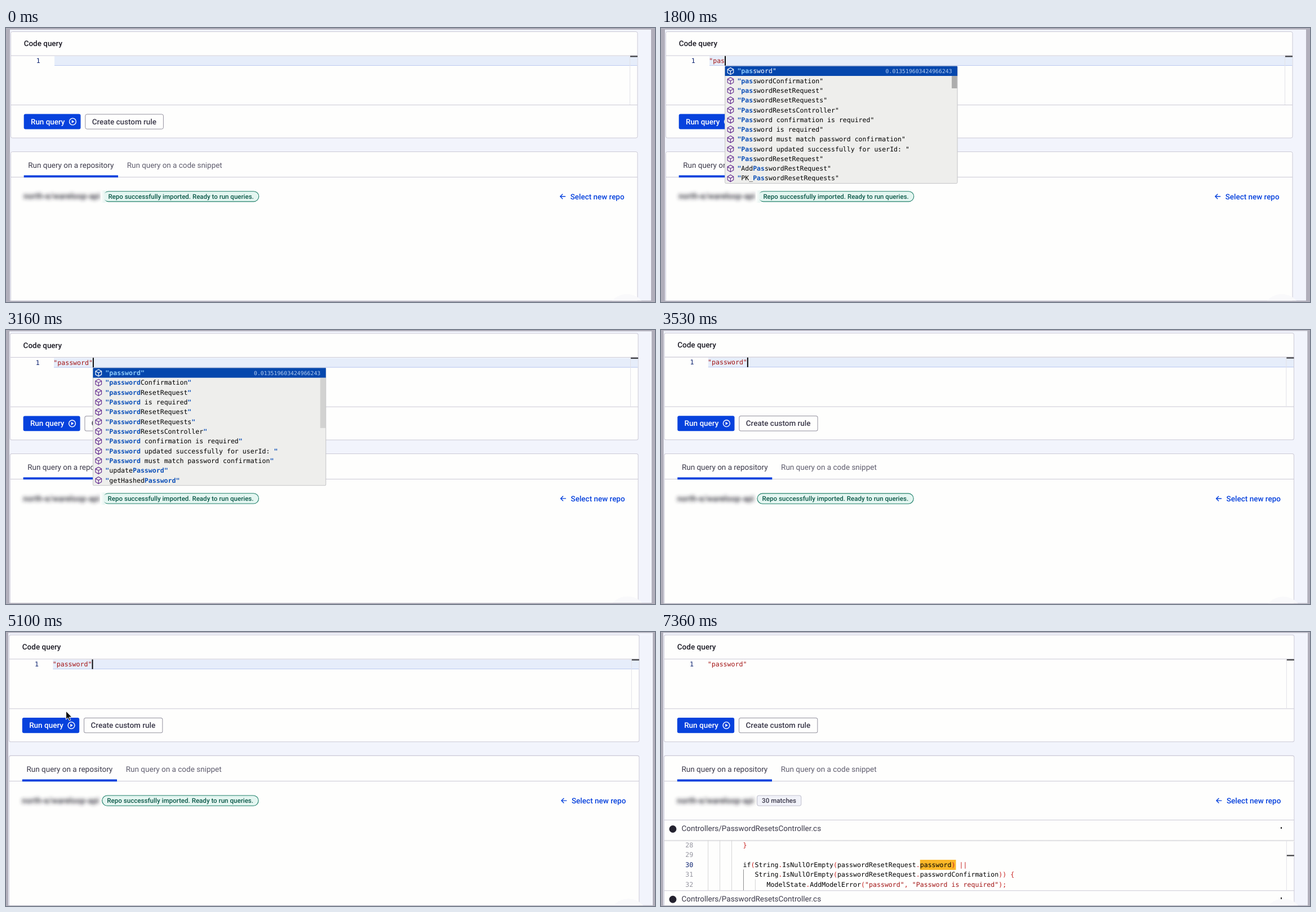
An HTML page for the animation above (8530 ms loop, 1152 by 486 pixels).

```html
<!DOCTYPE html>
<html lang="en">
<head>
<meta charset="utf-8">
<title>Code query</title>
<style>
html, body { margin: 0; width: 100%; height: 100%; overflow: hidden; background: #b1afbb; }
svg { display: block; width: 1152px; height: 486px; }
text { font: 400 13.44px Roboto, sans-serif; white-space: pre; fill: #3b394a; text-rendering: geometricPrecision; }
.m { font-weight: 500; }
.s { font-size: 11.52px; font-weight: 500; }
.c { font: 11.54px "DejaVu Sans Mono", monospace; fill: #000; }
.n { text-anchor: end; fill: #9696a0; }
.now { fill: #0b216f; }
.str { fill: #a31515; }
.p { fill: #c8201e; }
.hit { font-weight: 700; fill: #0b4fb8; }
.sel { fill: #fff; }
.sel .hit { fill: #8ecbfa; }
.score { font-size: 9.8px; fill: #b4cbef; text-anchor: end; }
.line { fill: none; stroke: #cbc9d6; }
.icon { fill: none; stroke-width: 1.4; }
</style>
</head>
<body>
<svg id="stage" viewBox="0 0 1152 486"></svg>
<script>
const LOOP = 8530;
const CHAR = 6.947;      // width of one code character
const ROW = 17.28;       // height of one code row
const COL = 85.3;        // left edge of the code
const BLUE = '#0742dd';

// [time, characters typed]
const KEYS = [[0, 0], [330, 0], [800, 1], [1460, 2], [1580, 3], [1730, 4], [2000, 5],
  [2130, 6], [2330, 7], [2500, 8], [2630, 9], [3060, 10]];
const QUERY = '"password"';
const POPUP = [1500, 3360];
const ZOOM = [2700, 3800];
const MOVE = [4830, 5200];
const CLICK = 5400, RESULT = 6000, CODE = 6130, LEAVE = [7000, 7360];

const BROAD = ['password', 'passwordConfirmation', 'passwordResetRequest', 'PasswordResetRequests',
  'PasswordResetsController', 'Password confirmation is required', 'Password is required',
  'Password must match password confirmation', 'Password updated successfully for userId: ',
  'PasswordResetRequest', 'AddPasswordRestRequest', 'PK_PasswordResetRequests'];
const EXACT = ['password', 'passwordConfirmation', 'passwordResetRequest', 'Password is required',
  'PasswordResetRequest', 'PasswordResetRequests', 'PasswordResetsController',
  'Password confirmation is required', 'Password updated successfully for userId: ',
  'Password must match password confirmation', 'updatePassword', 'getHashedPassword'];

const rect = (x, y, w, h, attrs) => `<rect x="${x}" y="${y}" width="${w}" height="${h}" ${attrs}/>`;
const text = (x, y, s, cls = '', attrs = '') => `<text x="${x}" y="${y}" class="${cls}" ${attrs}>${s}</text>`;
const path = (d, attrs) => `<path d="${d}" ${attrs}/>`;
const span = (cls, s) => `<tspan class="${cls}">${s}</tspan>`;
const group = (id, body) => `<g id="${id}">${body}</g>`;

function paint(code) {
  return code.replace(/"[^"]*"|[(){}.,;|]+/g, m => span(m[0] === '"' ? 'str' : 'p', m));
}

function fileHeader(y) {
  const corners = [[-1, -1], [1, -1], [1, 1], [-1, 1]].map(([a, b]) =>
    `M${1103.2 + 5 * a} ${y + 2.2 + 2 * b}v${3 * b}h${-3 * a}`).join('');
  return `<circle cx="23.9" cy="${y + .6}" r="6.4" fill="#24222f"/>`
    + text(39.3, y + 4.6, 'Controllers/PasswordResetsController.cs')
    + path(corners.replace(/M(\S+) (\S+)v(\S+)h(\S+)/g, (_, x, cy, v, h) =>
      `M${x} ${+cy + v / 3 * 3 - v}V${+cy + +v}H${+x + +h}`), 'class="icon" stroke="#111" style="stroke-width:1.8"');
}

function snippet() {
  const top = 368.5, lines = [[3, '}'], [0, ''],
    [3, 'if(String.IsNullOrEmpty(passwordResetRequest.password) ||'],
    [4, 'String.IsNullOrEmpty(passwordResetRequest.passwordConfirmation)) {'],
    [5, 'ModelState.AddModelError("password", "Password is required");']];
  const tab = 3 * CHAR, guide = (i, row, color) =>
    path(`M${86.2 + i * tab} ${top + row * ROW}V457`, `class="line" style="stroke:${color}"`);
  let out = rect(9, 368.3, 1112, 3, 'fill="url(#shade)"')
    + [0, 1, 2].map(i => guide(i, 0, '#d6d6d6')).join('')
    + guide(3, 3, '#8e8e8e') + guide(4, 4, '#d6d6d6')
    + rect(COL + 3 * tab + 45 * CHAR, 403.2, 9 * CHAR + .8, 17.8, 'fill="#fcb827"');
  lines.forEach(([depth, code], i) => {
    const y = 381.4 + i * ROW;
    out += text(60, y, 28 + i, 'c n' + (i === 2 ? ' now' : ''))
      + text(COL + depth * tab, y, paint(code), 'c');
  });
  return out + path('M1107.5 369V457', 'class="line" style="stroke:#e2e2e8"');
}

function suggestions(n) {
  const list = n === 10 ? EXACT : BROAD, width = 413;
  let out = rect(.5, 67.7, width - .5, 208, 'rx="2" fill="#eeeeec" stroke="#c4c4c6"')
    + rect(.5, 67.7, width - .5, ROW, 'fill="#0547ad"')
    + rect(width - 10, 85, 9.6, n < 5 ? 22 : 89, 'id="thumb" fill="#adadad"');
  list.forEach((word, i) => {
    const at = word.toLowerCase().indexOf('password'), end = at + Math.min(n - 1, 8);
    const label = span('hit', '"') + word.slice(0, at) + span('hit', word.slice(at, end))
      + word.slice(end) + (n === 10 ? span('hit', '"') : '"');
    const y = 76.4 + i * ROW;
    out += path('M0-6L5.3-3V3L0 6L-5.3 3V-3ZM-5.3-3L0 0L5.3-3M0 0V6',
      `class="icon" style="stroke-width:1.15" stroke="${i ? '#652d90' : '#fff'}" transform="translate(10.3 ${y})"`)
      + text(22.3, y + 4, label, i ? 'c' : 'c sel');
  });
  return out + text(width - 9.5, 80, '0.013519603424966243', 'c score');
}

const pill = (w, radius, fill, stroke) =>
  rect(172.8, 289.7, w, 18.2, `rx="${radius}" fill="${fill}" stroke="${stroke}" stroke-width="1.1"`);

const stage = document.getElementById('stage');
stage.innerHTML = `
<defs>
  <clipPath id="frame">${rect(7, 2.7, 1138, 480.8, '')}</clipPath>
  <linearGradient id="shade" x2="0" y2="1"><stop stop-color="#d4d4d8"/><stop offset="1" stop-color="#fefefd"/></linearGradient>
  <linearGradient id="veil"><stop stop-color="#fefefd"/><stop offset=".6" stop-color="#eaf6f3"/><stop offset="1" stop-color="#e4f6f1" stop-opacity="0"/></linearGradient>
  <filter id="blur" x="-20%" y="-60%" width="140%" height="220%"><feGaussianBlur stdDeviation="3.1"/></filter>
</defs>
${rect(0, 0, 1152, 486, 'fill="#b1afbb"')}
<g id="page"><g clip-path="url(#frame)">`
  + rect(7, 2, 1138, 483, 'fill="#f2f4fc"')
  + rect(8.5, 6.5, 1112.5, 188.5, 'rx="3" fill="#fefefd" stroke="#cbc9d6"')
  + rect(8.5, 219.5, 1112.5, 290, 'rx="3" fill="#fefefd" stroke="#cbc9d6"')
  + '<ellipse cx="1102" cy="500" rx="32" ry="28" fill="#f9f9fb"/>'
  + text(31.7, 32, 'Code query', 'm', 'style="fill:#1b1a24"')
  + group('active', rect(86, 50, 1034.5, 17, 'fill="#e6edfa"') + rect(86, 66, 1034.5, 1, 'fill="#bccaf0"'))
  + path('M9 49H1121M9 136.5H1121M9 264.5H1121', 'class="line"')
  + path('M1107.5 50V136', 'class="line" style="stroke:#e2e2e8"')
  + rect(1108, 49.3, 13, 2.2, 'fill="#3c3c40"')
  + text(60.7, 62, '1', 'c n now')
  + text(COL, 62, '', 'c str', 'id="typed"')
  + rect(0, 49.7, 1.9, 17, 'id="caret"')
  + rect(31.7, 152.6, 100.8, 26.9, `rx="3" id="run" fill="${BLUE}"`)
  + text(44, 170.6, 'Run query', 'm', 'style="fill:#fff"')
  + '<circle cx="118.4" cy="166" r="5.9" class="icon" stroke="#fff"/>'
  + path('M116.7 163.2V168.8L121.2 166Z', 'fill="#fff"')
  + rect(140.8, 153, 138.6, 26.2, 'rx="3" fill="#fefefd" stroke="#94929f"')
  + text(152.7, 170.6, 'Create custom rule', 'm')
  + text(39.3, 247.7, 'Run query on a repository')
  + text(214.7, 247.7, 'Run query on a code snippet', '', 'style="fill:#5f5d6e"')
  + rect(31.7, 261.3, 167.3, 3.84, `fill="${BLUE}"`)
  + text(31, 303.4, 'north-e/wareloop-api', 'm', 'filter="url(#blur)" style="font-size:14.4px;fill:#2c2a35"')
  + group('ready', pill(276, 9.1, '#e4f6f1', '#20806a')
    + text(181.4, 303, 'Repo successfully imported. Ready to run queries.', 's', 'style="fill:#0b5848"')
    + rect(168, 288, 11, 22, 'id="veil-box" fill="url(#veil)"'))
  + group('running', pill(121.6, 9.1, '#e2eafd', '#1448d8')
    + '<circle cx="186.8" cy="298.8" r="4.9" class="icon" stroke="#b9c9f5" style="stroke-width:2"/>'
    + path('M181.9 298.8A4.9 4.9 0 0 1 186.8 293.9', 'id="spin" class="icon" stroke="#0b37b4" style="stroke-width:2"')
    + text(202.2, 303, 'Running query...', 's', 'style="fill:#0d38ac"'))
  + group('matches', pill(77.7, 3.5, '#f1f2f9', '#c3c3d0') + text(181.2, 303, '30 matches', 's'))
  + path('M993.2 298.8H984M988.2 294.4L983.8 298.8L988.2 303.2', `class="icon" stroke="${BLUE}"`)
  + text(1001.7, 303.5, 'Select new repo', 'm', `style="fill:${BLUE}"`)
  + group('results', path('M9 333H1121M9 457.5H1121', 'class="line"')
    + fileHeader(348.3) + fileHeader(472.4) + group('code', snippet()))
  + rect(1108, 390.6, 13, 1, 'id="tick" fill="#3c3c40"')
  + '<g id="popup"></g></g></g>'
  + group('cursor', path('M0 0V15L3.5 11.8L5.8 17L8.2 16L5.9 10.9H10.6Z', 'id="arrow" fill="#111" stroke="#fff"')
    + path('M-1.3 1C-1.3-1.3 1.5-1.3 1.6 1V5C2-.1 4.3 4 4.3 5.3C5 4.2 6.8 4.6 6.8 6C7.5 5.2 9 5.7 9 7.2V10C9 12 7.7 12.6 7.5 15.5H.2C-.2 13-3.3 10.8-4.3 8.4C-4.7 7-3 6.5-1.3 8.3Z',
      'id="hand" fill="#fff" stroke="#111" stroke-width="1.1"'));

const $ = Object.fromEntries([...stage.querySelectorAll('[id]')].map(e => [e.id, e]));
const show = (el, on) => { el.style.display = on ? '' : 'none'; };
const phase = (t, [a, b]) => Math.min(1, Math.max(0, (t - a) / (b - a)));
const ease = p => p * p * (3 - 2 * p);
const mix = (a, b, p) => a + (b - a) * p;
let listed = -1;

function draw(t) {
  const [keyTime, n] = KEYS.findLast(k => k[0] <= t);
  const caretX = COL + n * CHAR;

  const zoom = 1 + .0053 * ease(phase(t, ZOOM));
  $.page.setAttribute('transform', `translate(576 243) scale(${zoom}) translate(-576 -243)`);

  $.typed.textContent = QUERY.slice(0, n);
  $.caret.setAttribute('x', caretX);
  show($.caret, t >= 330 && t < CLICK && (t - keyTime) % 1000 < 500);
  show($.active, t < CLICK);

  const open = t >= POPUP[0] && t < POPUP[1];
  show($.popup, open);
  if (open) {
    if (listed !== n) $.popup.innerHTML = suggestions(listed = n);
    $.popup.setAttribute('transform', `translate(${caretX} 0)`);
    document.getElementById('thumb').style.opacity = 1 - phase(t, [3060, 3240]);
  }

  show($.ready, t < CLICK);
  show($['veil-box'], t < POPUP[1]);
  show($.running, t >= CLICK && t < RESULT);
  $.spin.setAttribute('transform', `rotate(${(t - 5600) * .45} 186.8 298.8)`);
  show($.matches, t >= RESULT);
  show($.results, t >= RESULT);
  show($.code, t >= CODE);

  const settled = t >= LEAVE[1];
  show($.tick, t >= 6700);
  $.tick.setAttribute('y', settled ? 394.6 : 390.6);
  $.tick.setAttribute('height', settled ? 2.2 : 1);

  const p = ease(phase(t, MOVE)), x = mix(168, 93.3, p), y = mix(13, 167.4, p);
  const over = x < 130 && y > 152;
  show($.cursor, t >= MOVE[0] && t < LEAVE[1]);
  show($.hand, over);
  show($.arrow, !over);
  $.cursor.setAttribute('transform', `translate(${x} ${y})`);
  $.cursor.style.opacity = 1 - phase(t, [7000, 7200]);

  const hover = phase(t, [5110, 5260]) - phase(t, LEAVE);
  $.run.setAttribute('fill', `rgb(${mix(7, 5, hover)} ${mix(66, 42, hover)} ${mix(221, 176, hover)})`);
}

const start = performance.now();
(function tick() {
  draw((performance.now() - start) % LOOP);
  requestAnimationFrame(tick);
})();
</script>
</body>
</html>
```
